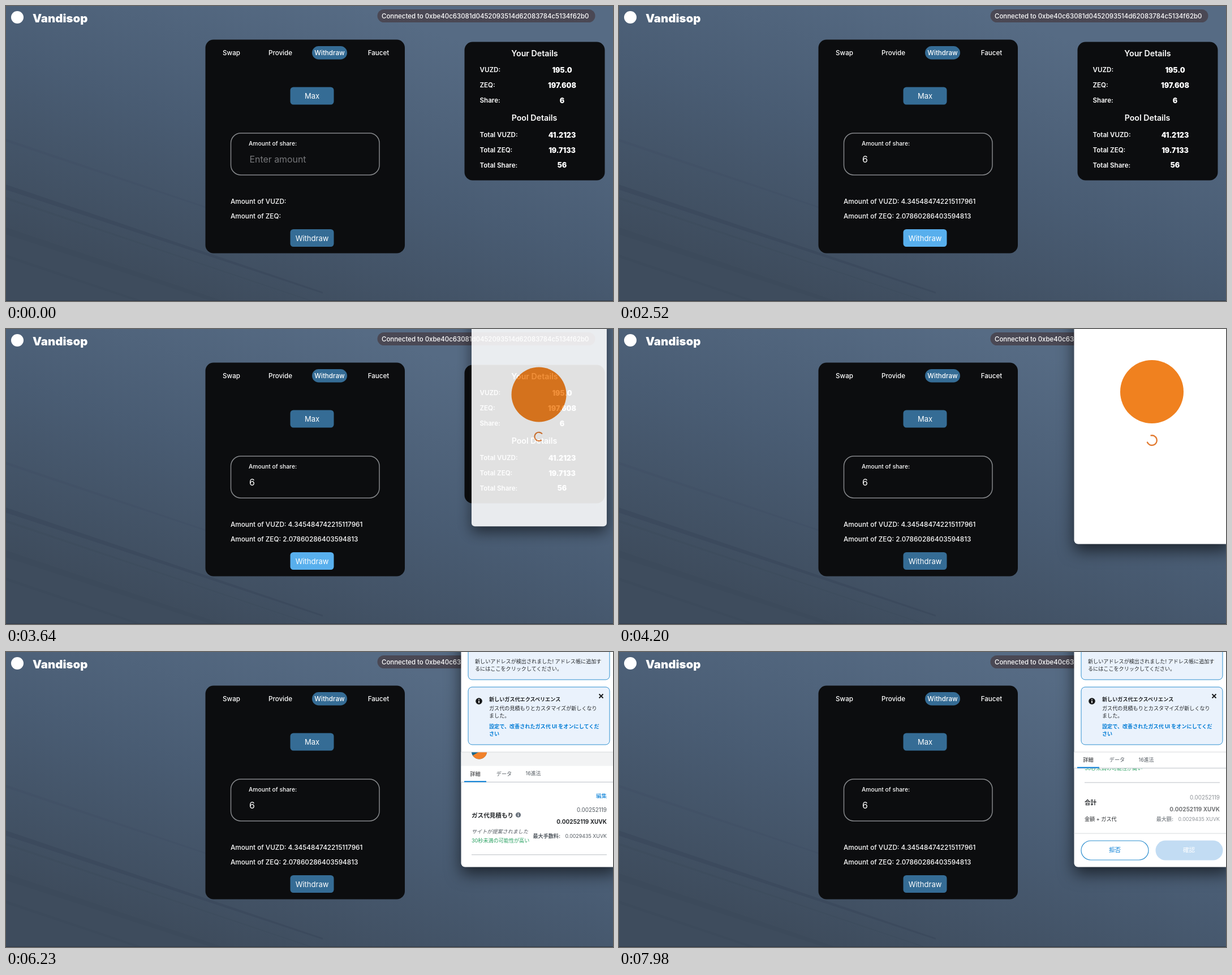
Recreate the animation shown at these times as an HTML page. Size 1073x522 px, loop 8 s.

```html
<!DOCTYPE html>
<html lang="en">
<head>
<meta charset="utf-8">
<title>Vandisop</title>
<style>
html, body { margin: 0; width: 100%; height: 100%; overflow: hidden; background: #4a5c73; }
svg { display: block; width: 1073px; height: 522px; }
text { font-family: Inter, "Noto Sans CJK JP", "Noto Sans CJK", sans-serif; white-space: pre; }
#win { transform-origin: 942px 148px; }
#frame { filter: drop-shadow(0 12px 14px rgba(0, 0, 0, .6)); }
</style>
</head>
<body>
<svg id="stage" viewBox="0 0 1073 522" xmlns="http://www.w3.org/2000/svg"></svg>
<script>
const LOOP = 8000, STEP = 70, SCROLL = 176;
const BLUE = '#356c95', LIT = '#58afed', LINK = '#037dd6', INK = '#24272a', GREY = '#535a61';

// text centred vertically on y; opts: w weight, f fill, a anchor, x extra attributes
const T = (x, y, s, size, o = {}) =>
  `<text x="${x}" y="${(y + size * .365).toFixed(2)}" font-size="${size}" font-weight="${o.w || 400}" ` +
  `fill="${o.f || '#fff'}" text-anchor="${o.a || 'start'}" ${o.x || ''}>${s}</text>`;
const R = (x, y, w, h, r, fill, x2 = '') =>
  `<rect x="${x}" y="${y}" width="${w}" height="${h}" rx="${r}" fill="${fill}" ${x2}/>`;
const line = (x1, y, x2, c, w = 1) => `<path d="M${x1} ${y}H${x2}" stroke="${c}" stroke-width="${w}"/>`;
const mid = { a: 'middle' };
const bold = { w: 500 };
const end = (f, w) => ({ a: 'end', f, w });
const info = (x, y, r, c) => `<circle cx="${x}" cy="${y}" r="${r}" fill="${c}"/>` +
  `<path d="M${x} ${y - r * .15}V${y + r * .55}M${x} ${y - r * .6}v${r * .25}" stroke="#fff" stroke-width="${r * .3}"/>`;

const stripes = [[235, 5, .08], [316, 9, .24], [338, 4, .1], [392, 12, .1], [440, 5, .1]]
  .map(([y, h, o]) => `<path d="M0 ${y}L560 ${y + 190}v${h * .3}L0 ${y + h}z" fill="#2b394b" opacity="${o}"/>`).join('');

const row = (y, k, v) => T(837.5, y, k, 11.6, { w: 600 }) + T(983, y, v, 12.5, { w: 900, a: 'middle' });
const button = (id, y, label) => R(502.5, y, 77, 31, 5.5, BLUE, `id="${id}"`) +
  T(541, y + 16, label, 13, mid);

const page = `
  ${R(0, 0, 1073, 522, 0, 'url(#bg)')}${stripes}${R(0, 521, 1073, 1, 0, '#2f3a48')}
  <circle cx="20" cy="20" r="11" fill="#fff"/>
  ${T(47, 22, 'Vandisop', 20.4, { w: 900 })}
  ${R(656.5, 6, 385, 23, 11.5, '#4a4854')}
  ${T(664, 18, 'Connected to 0xbe40c63081d0452093514d62083784c5134f62b0', 11.45, bold)}
  ${R(352.5, 59.5, 352.5, 378, 14.4, '#0c0d0f')}
  ${R(541, 71, 62, 23.5, 11.7, BLUE)}
  ${[['Swap', 398.5], ['Provide', 485], ['Withdraw', 572], ['Faucet', 658.5]]
    .map(([s, x]) => T(x, 83, s, 11.6, { a: 'middle', w: 500 })).join('')}
  ${button('max', 143.5, 'Max')}
  ${R(397.5, 225, 262.5, 74, 17.5, 'none', 'stroke="#85878a" stroke-width="1.5"')}
  ${T(429, 243, 'Amount of share:', 10.35, bold)}
  ${T(430.5, 271, 'Enter amount', 15.9, { f: '#76777a', x: 'id="hint"' })}
  ${T(430, 271, '6', 15.9, { x: 'id="share"' })}
  ${T(397, 345.5, 'Amount of VUZD:<tspan class="out"> 4.345484742215117961</tspan>', 11.75, bold)}
  ${T(397, 372, 'Amount of ZEQ:<tspan class="out"> 2.07860286403594813</tspan>', 11.75, bold)}
  ${button('draw', 395, 'Withdraw')}
  ${R(810.5, 63.5, 248, 245, 14.4, '#0c0d0f')}
  ${T(934.5, 83.5, 'Your Details', 14.2, { w: 600, a: 'middle' })}
  ${row(113, 'VUZD:', '195.0')}${row(140, 'ZEQ:', '197.608')}${row(167, 'Share:', '6')}
  ${T(934, 198, 'Pool Details', 14.2, { w: 600, a: 'middle' })}
  ${row(228, 'Total VUZD:', '41.2123')}${row(255, 'Total ZEQ:', '19.7133')}${row(281.5, 'Total Share:', '56')}`;

const loader = `<g id="loader">
  <circle cx="942" cy="111" r="56" fill="#f0811f"/>
  <circle id="spin" cx="942" cy="197" r="8.8" fill="none" stroke="#e27a30" stroke-width="2.4" stroke-dasharray="41 14.3"/>
</g>`;

const banner = (y, h) => R(817, y, 250, h, 7, '#eaf2fc', 'stroke="#2f8fcf"');
const notices = `
  ${banner(-20, 69)}
  ${T(829, 17, '新しいアドレスが検出されました! アドレス帳に追加す', 9.1, { f: INK })}
  ${T(829, 30, 'るにはここをクリックしてください。', 9.1, { f: INK })}
  <g id="tip">${banner(62, 102)}${info(836, 87, 5.8, '#16181a')}
  ${T(854, 83.5, '新しいガス代エクスペリエンス', 9.1, { f: INK, w: 700 })}
  ${T(854, 99.5, 'ガス代の見積もりとカスタマイズが新しくなり', 9.1, { f: INK })}
  ${T(854, 112.5, 'ました。', 9.1, { f: INK })}
  ${T(854, 131.5, '設定で、改善されたガス代 UI をオンにしてくだ', 9.1, { f: LINK, w: 700 })}
  ${T(854, 144.5, 'さい', 9.1, { f: LINK, w: 700 })}
  <path d="M1048.5 74.5l7 7m0-7l-7 7" stroke="#16181a" stroke-width="1.8"/></g>`;

const summary = `
  ${R(804, 177, 276, 73, 0, '#f2f3f4')}
  ${R(823, 185, 147, 19, 3, '#f5f6f7', 'stroke="#bbc0c5"')}
  ${T(829.5, 194.5, '0x527...4DcF', 9.8, { f: LINK })}
  ${T(892, 194.5, ': WITHDRAW', 8.6, { f: GREY })}${info(956.5, 194.5, 4.6, '#6a737d')}
  <g clip-path="url(#disc)">${R(822, 209, 30, 30, 0, '#17698f')}
  ${R(822, 209, 15, 15, 0, '#f6b613')}<path d="M822 233L852 216V240H822z" fill="#f1812a"/></g>`;

const gas = `<g id="gas">
  ${T(1062, 302.5, '編集', 9.5, end(LINK, 500))}
  <g id="early">
    ${T(823, 328, 'ガス代見積もり', 10.6, { f: INK, w: 700 })}${info(905.5, 327.5, 4.6, '#6a737d')}
    ${T(1016, 328, '0', 10, end(GREY))}${T(1062, 328, '0 XUVK', 10.2, end(INK, 700))}
    ${T(823, 348, 'サイトが提案されました', 9.1, { f: GREY, x: 'font-style="italic"' })}
    ${T(823, 364, '不明な処理時間', 9.1, { f: '#c8202d', w: 500 })}${info(896.5, 363.5, 4.6, '#c8202d')}
    ${T(1022, 356, '最大手数料:', 9.1, end(GREY, 700))}${T(1062, 356, '0 XUVK', 8.9, end(GREY))}
  </g>
  <g id="late">
    ${T(823, 337, 'ガス代見積もり', 10.6, { f: INK, w: 700 })}${info(905.5, 336.5, 4.6, '#6a737d')}
    ${T(823, 366, 'サイトが提案されました', 9.1, { f: GREY, x: 'font-style="italic"' })}
    ${T(823, 382, '30秒未満の可能性が高い', 9.1, { f: '#28a060' })}
    <g class="fade">${T(1062, 328, '0.00252119', 9.9, end(GREY))}
    ${T(1062, 349, '0.00252119 XUVK', 10, end(INK, 700))}
    ${T(980, 374, '最大手数料:', 9.1, end(GREY, 700))}${T(1062, 374, '0.0029435 XUVK', 8.9, end(GREY))}</g>
  </g></g>`;

const total = `<g transform="translate(0 ${SCROLL})">
  ${line(823, 231, 1062, '#bbc0c5', 1.2)}
  ${T(823, 266, '合計', 10.6, { f: INK, w: 700 })}
  ${T(823, 295.5, '金額 + ガス代', 9.1, { f: INK })}
  <g class="fade">${T(1062, 257.5, '0.00252119', 9.9, end(GREY))}
  ${T(1062, 278.5, '0.00252119 XUVK', 10, end(INK, 700))}
  ${T(980, 295.5, '最大額:', 9.1, end(GREY, 700))}${T(1062, 295.5, '0.0029435 XUVK', 8.9, end(GREY))}</g>
  ${line(804, 321, 1080, '#d6d9dc')}
  ${R(817, 334, 119, 34, 17, '#fff', 'stroke="#2f8fcf" stroke-width="1.2"')}
  ${T(876.5, 350.5, '拒否', 10.6, { f: LINK, a: 'middle' })}
  ${R(948.5, 333.5, 119, 35, 17.5, '#c2dcf3')}
  ${T(1007.5, 350.5, '確認', 10.6, mid)}
</g>`;

const tabs = `<g id="tabs">${R(804, 250, 276, 29, 0, '#fff')}
  ${line(804, 278.5, 1080, '#d0d4d8', 1.4)}${line(810, 277.5, 849, LINK, 2)}
  ${T(829.5, 263.5, '詳細', 9.3, { f: INK, w: 500, a: 'middle' })}
  ${T(880.5, 263.5, 'データ', 9.1, { f: GREY, a: 'middle' })}
  ${T(932, 263.5, '16進法', 8.9, { f: GREY, a: 'middle' })}</g>`;

stage.innerHTML = `<defs>
  <linearGradient id="bg" gradientUnits="userSpaceOnUse" x1="620" y1="0" x2="440" y2="540">
    <stop offset="0" stop-color="#566b84"/><stop offset=".5" stop-color="#495c73"/><stop offset="1" stop-color="#3e4c5d"/>
  </linearGradient>
  <clipPath id="edge"><rect x="804.5" y="-84" width="276" height="464.5" rx="7"/></clipPath>
  <clipPath id="view"><rect x="804" y="177" width="277" height="204"/></clipPath>
  <clipPath id="disc"><circle cx="836.5" cy="224" r="13.7"/></clipPath>
  </defs>${page}
  <g id="win">${R(804.5, -84, 276, 464.5, 7, '#fff', 'id="frame"')}
    <g clip-path="url(#edge)">${loader}<g id="ask">${notices}
      <g clip-path="url(#view)"><g id="body">${summary}${gas}${total}</g>${tabs}</g>
      ${line(804, 177, 1080, '#d6d9dc')}</g></g>
  </g>`;

const $ = id => document.getElementById(id);
const all = c => [...document.querySelectorAll(c)];
const show = (el, on) => { el.style.display = on ? '' : 'none'; };

// linear interpolation over [time, value] pairs
function track(keys, t) {
  if (t <= keys[0][0]) return keys[0][1];
  for (let i = 1; i < keys.length; i++) {
    const [a, u] = keys[i - 1], [b, v] = keys[i];
    if (t <= b) return u + (v - u) * (t - a) / (b - a);
  }
  return keys[keys.length - 1][1];
}
const ZOOM = [[3570, .78], [3640, .866], [3710, .95], [3780, .988], [3850, 1]];
const ALPHA = [[3570, .45], [3640, .88], [3710, .98], [3780, 1]];
const PULSE = [[6300, 1], [6580, .75], [6860, .28], [7000, .14], [7140, .08], [7420, .08], [7560, .15], [7980, .65]];
const easeOut = p => 1 - (1 - p) ** 2.4;
const outs = all('.out'), fades = all('.fade');

function draw(now) {
  const t = Math.floor(now % LOOP / STEP) * STEP;
  $('max').setAttribute('fill', t >= 1120 && t < 2100 ? LIT : BLUE);
  $('draw').setAttribute('fill', t >= 2520 && t < 3780 ? LIT : BLUE);
  show($('hint'), t < 1750);
  show($('share'), t >= 1750);
  outs.forEach(e => show(e, t >= 1820));

  show($('win'), t >= 3570);
  $('win').style.transform = `scale(${track(ZOOM, t)})`;
  $('win').style.opacity = track(ALPHA, t);
  show($('loader'), t < 4970);
  $('spin').setAttribute('transform', `rotate(${(Math.min(t, 4760) - 3640) * .36 + 52} 942 197)`);

  show($('ask'), t >= 4970);
  show($('tip'), t >= 5040);
  show($('gas'), t >= 5180);
  show($('early'), t < 5320);
  show($('late'), t >= 5320);
  const s = SCROLL * easeOut(Math.min(1, Math.max(0, (t - 6160) / 560)));
  $('body').setAttribute('transform', `translate(0 ${-s})`);
  $('tabs').setAttribute('transform', `translate(0 ${-Math.min(s, 73)})`);
  fades.forEach(e => { e.style.opacity = track(PULSE, t); });
}
function tick() {
  draw(performance.now());
  requestAnimationFrame(tick);
}
tick();
</script>
</body>
</html>
```
